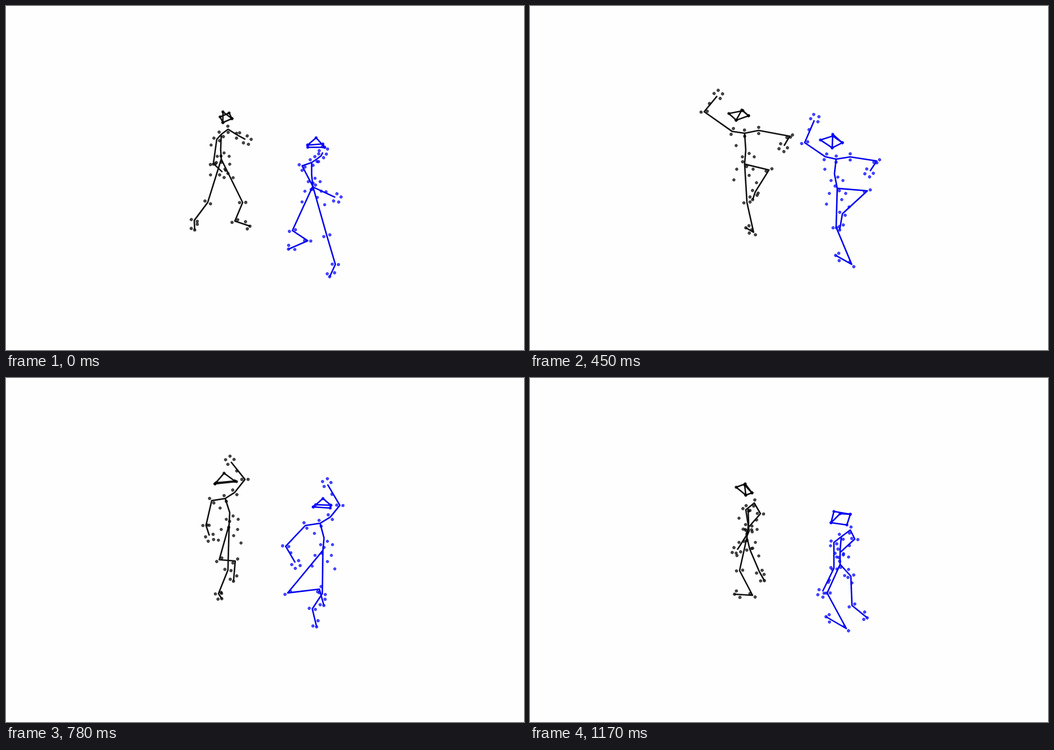
These frames come from a looping animation (917x611 px, 1.2 s). An HTML page without scripts:

```html
<!DOCTYPE html>
<html lang="en">
<head>
<meta charset="utf-8">
<title>Two turning dancers</title>
<style>
html, body { margin: 0; height: 100%; overflow: hidden; background: #fefefe; }
svg { display: block; width: 100vw; height: 100vh; }
path { fill: none; stroke-width: 2.6; stroke-linejoin: round; animation: 1.2s linear infinite; }
marker { overflow: visible; }
circle { r: 2.3px; fill-opacity: .7; stroke-opacity: .7; }
.dark { fill: #000; stroke: #000; }
.blue { fill: #00f; stroke: #00f; }
g.dark { stroke: #111; }
g.blue { stroke: #00e; }

/* Hand to hand across the shoulders */
@keyframes darkArms {
  0% { d: path("M424 237 411 230 393 219 381 228 373 237 367 280 383 295") }
  22.5% { d: path("M327 212 361 210 390 213 390 226 393 232 397 256 375 253") }
  37.5% { d: path("M331 160 308 188 358 223 380 226 405 221 460 231 450 248") }
  47.5% { d: path("M368 141 347 162 360 203 371 216 391 228 424 267 417 278") }
  65% { d: path("M398 149 423 180 405 203 388 214 364 218 354 262 360 280") }
  75% { d: path("M427 150 431 191 410 210 398 213 380 205 363 232 355 266") }
  97.5%, to { d: path("M367 305 388 272 382 234 386 231 397 222 408 241 387 265") }
}
@keyframes blueArms {
  0% { d: path("M561 260 558 266 550 272 541 278 524 284 544 322 583 340") }
  22.5% { d: path("M499 259 526 250 550 261 562 275 568 279 574 305 548 308") }
  37.5% { d: path("M503 203 486 243 523 268 542 272 567 268 614 275 602 293") }
  47.5% { d: path("M541 193 518 213 522 250 535 264 552 273 591 310 596 326") }
  65% { d: path("M569 189 591 226 574 247 556 258 530 262 495 299 512 328") }
  75% { d: path("M596 203 591 243 579 260 563 263 545 255 506 274 504 306") }
  97.5%, to { d: path("M518 379 538 338 538 292 551 282 567 270 575 286 550 309") }
}

/* Neck to hip */
@keyframes darkSpine {
  0% { d: path("M381 228 380 255 381 272") }
  22.5% { d: path("M390 226 389 250 402 273") }
  37.5% { d: path("M380 226 382 256 380 281") }
  47.5% { d: path("M371 216 377 246 374 266") }
  65% { d: path("M388 214 396 239 395 260") }
  75% { d: path("M398 213 400 241 397 266") }
  97.5%, to { d: path("M386 231 387 257 384 283") }
}
@keyframes blueSpine {
  0% { d: path("M541 278 541 300 543 320") }
  22.5% { d: path("M562 275 567 296 574 322") }
  37.5% { d: path("M542 272 539 298 544 324") }
  47.5% { d: path("M535 264 533 293 531 314") }
  65% { d: path("M556 258 563 284 561 306") }
  75% { d: path("M563 263 564 289 565 314") }
  97.5%, to { d: path("M551 282 549 306 549 331") }
}

/* Standing toe, over the hip, to the working toe */
@keyframes darkLegs {
  0% { d: path("M432 391 405 382 419 349 381 272 357 349 333 381 334 398") }
  22.5% { d: path("M403 406 446 393 405 357 402 273 379 311 402 352 355 349") }
  27.5% { d: path("M396 402 430 396 398 354 395 276 318 284 256 292 226 296") }
  32.5% { d: path("M389 398 413 399 391 351 388 279 455 287 508 293 533 304") }
  37.5% { d: path("M382 394 396 402 384 349 380 281 423 291 399 330 394 344") }
  47.5% { d: path("M386 389 372 390 393 341 374 266 434 308 387 327 412 340") }
  65% { d: path("M382 392 376 383 393 341 395 260 378 323 406 325 403 361") }
  75% { d: path("M380 393 393 384 382 340 397 266 319 302 393 322 371 354") }
  97.5%, to { d: path("M362 384 394 386 371 342 384 283 389 304 406 344 415 360") }
}
@keyframes blueLegs {
  0% { d: path("M573 481 583 459 568 408 543 320 507 399 534 417 500 432") }
  22.5% { d: path("M566 459 590 438 560 405 574 322 517 351 549 400 513 401") }
  27.5% { d: path("M558 454 583 445 554 401 564 323 478 341 408 352 374 360") }
  32.5% { d: path("M549 449 577 452 548 397 554 323 626 330 671 336 693 346") }
  37.5% { d: path("M541 443 570 459 542 393 544 324 597 328 553 369 548 398") }
  47.5% { d: path("M548 436 516 450 537 385 531 314 621 367 563 364 562 387") }
  65% { d: path("M550 442 542 410 560 383 561 306 499 382 555 375 563 404") }
  75% { d: path("M535 440 572 419 553 389 565 314 474 344 532 376 529 407") }
  97.5%, to { d: path("M524 424 560 445 526 382 549 331 568 352 570 404 597 426") }
}

/* Head band, then its crown point */
@keyframes darkHead {
  0% { d: path("M400 200 384 207 379 197 395 190ZL384 188 384 207") }
  22.5% { d: path("M405 203 384 203 375 188 391 191ZL389 184 384 203") }
  37.5% { d: path("M387 195 365 203 352 191 377 186ZL375 185 365 203") }
  47.5% { d: path("M379 184 373 190 352 185 365 176ZL362 170 352 185") }
  65% { d: path("M405 183 408 184 370 188 372 186ZL386 169 370 188") }
  75% { d: path("M397 188 409 192 367 180 388 185ZL391 173 367 180") }
  97.5%, to { d: path("M393 204 382 208 365 194 381 188ZL380 190 382 208") }
}
@keyframes blueHead {
  0% { d: path("M564 251 534 251 534 247 561 245ZL549 234 534 247") }
  22.5% { d: path("M572 245 565 251 537 247 546 244ZL556 233 537 247") }
  37.5% { d: path("M553 243 535 252 514 238 536 231ZL536 228 535 252") }
  47.5% { d: path("M554 227 533 240 515 231 538 217ZL530 218 533 240") }
  65% { d: path("M575 226 574 231 544 229 548 225ZL561 214 544 229") }
  75% { d: path("M583 233 577 237 548 233 557 231ZL569 219 548 233") }
  97.5%, to { d: path("M567 242 561 261 533 257 538 237ZL549 241 533 257") }
}

.dark .arms { animation-name: darkArms; marker-mid: url(#darkJoint); marker-start: url(#darkHand); marker-end: url(#darkHand); }
.blue .arms { animation-name: blueArms; marker-mid: url(#blueJoint); marker-start: url(#blueHand); marker-end: url(#blueHand); }
.dark .legs { animation-name: darkLegs; marker-mid: url(#darkJoint); marker-start: url(#darkFoot); marker-end: url(#darkFoot); }
.blue .legs { animation-name: blueLegs; marker-mid: url(#blueJoint); marker-start: url(#blueFoot); marker-end: url(#blueFoot); }
.dark .spine { animation-name: darkSpine; marker-mid: url(#darkChest); marker-end: url(#darkHip); }
.blue .spine { animation-name: blueSpine; marker-mid: url(#blueChest); marker-end: url(#blueHip); }
.dark .head { animation-name: darkHead; marker: url(#darkDot); }
.blue .head { animation-name: blueHead; marker: url(#blueDot); }
</style>
</head>
<body>
<svg viewBox="0 0 917 611">
  <defs>
    <!-- Tracking dots, placed relative to the joint they surround -->
    <circle id="dot"/>
    <g id="joint"><circle cy="5.5"/><circle cy="-5.5"/></g>
    <g id="hand"><circle cx="9" cy="5"/><circle cx="9" cy="-5"/><circle cy="7"/><circle cy="-7"/><circle cx="-19" cy="-2"/></g>
    <g id="foot"><circle/><circle cx="-3" cy="6"/><circle cx="-10" cy="-5"/></g>
    <g id="chest"><circle cx="-6" cy="12"/><circle cx="6" cy="6"/><circle cx="15" cy="12"/><circle cx="-17" cy="-8"/></g>
    <g id="hip"><circle cx="-14" cy="9"/><circle cx="15" cy="9"/><circle cx="8" cy="20"/><circle cx="-19" cy="28"/><circle cx="21" cy="33"/></g>

    <g class="dark">
      <marker id="darkDot" markerUnits="userSpaceOnUse" class="dark"><use href="#dot"/></marker>
      <marker id="darkJoint" markerUnits="userSpaceOnUse" orient="auto" class="dark"><use href="#joint"/></marker>
      <marker id="darkHand" markerUnits="userSpaceOnUse" orient="auto-start-reverse" class="dark"><use href="#hand"/></marker>
      <marker id="darkFoot" markerUnits="userSpaceOnUse" orient="auto-start-reverse" class="dark"><use href="#foot"/></marker>
      <marker id="darkChest" markerUnits="userSpaceOnUse" class="dark"><use href="#chest"/></marker>
      <marker id="darkHip" markerUnits="userSpaceOnUse" class="dark"><use href="#hip"/></marker>
    </g>
    <g class="blue">
      <marker id="blueDot" markerUnits="userSpaceOnUse" class="blue"><use href="#dot"/></marker>
      <marker id="blueJoint" markerUnits="userSpaceOnUse" orient="auto" class="blue"><use href="#joint"/></marker>
      <marker id="blueHand" markerUnits="userSpaceOnUse" orient="auto-start-reverse" class="blue"><use href="#hand"/></marker>
      <marker id="blueFoot" markerUnits="userSpaceOnUse" orient="auto-start-reverse" class="blue"><use href="#foot"/></marker>
      <marker id="blueChest" markerUnits="userSpaceOnUse" class="blue"><use href="#chest"/></marker>
      <marker id="blueHip" markerUnits="userSpaceOnUse" class="blue"><use href="#hip"/></marker>
    </g>
  </defs>
  <g class="dark">
    <path class="spine"/>
    <path class="arms"/>
    <path class="legs"/>
    <path class="head"/>
  </g>
  <g class="blue">
    <path class="spine"/>
    <path class="arms"/>
    <path class="legs"/>
    <path class="head"/>
  </g>
</svg>
</body>
</html>
```
